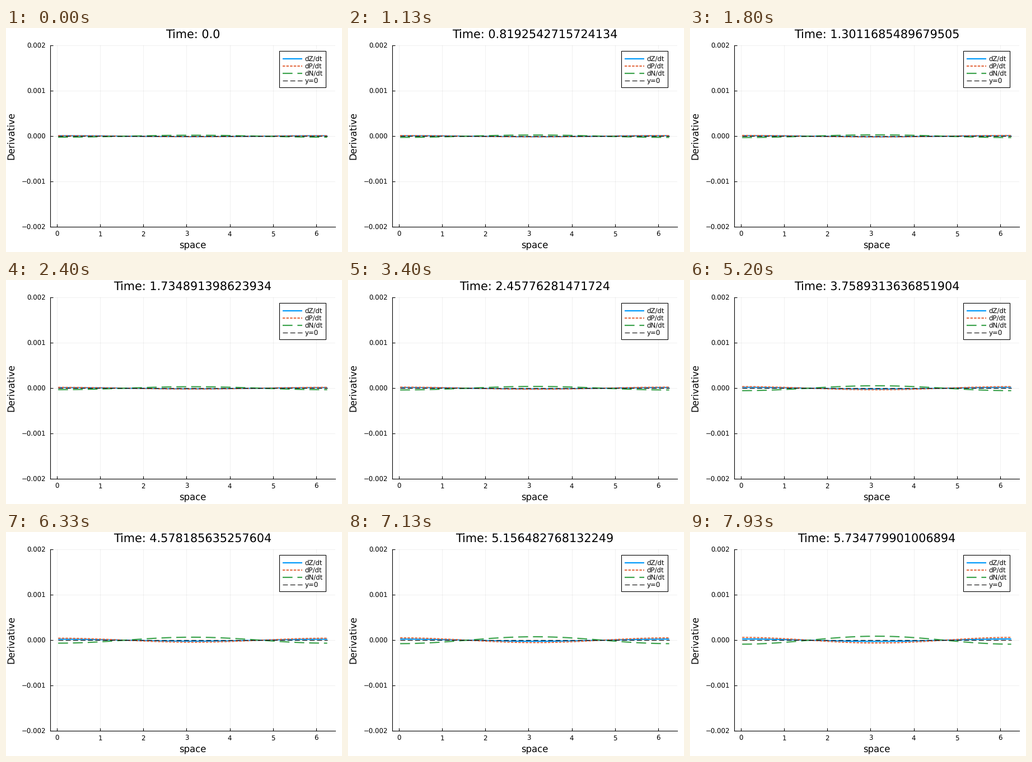
Write a matplotlib script that moves like this. It is 600 px wide and 400 px high and loops after 8 s.

```python
import numpy as np
import matplotlib.pyplot as plt
from matplotlib.animation import FuncAnimation
from matplotlib.patches import Rectangle

W, H, DPI = 600, 400, 100
TICK_MS, LOOP_MS, STEPS = 20, 8000, 120
DT, DT_SCALE = 481914277395537253, 10**19  # time per step as an exact fraction
PT = 72 / DPI                              # points per pixel
LEFT, RIGHT, TOP, BOTTOM = 78.7, 588, 31, 355.4
Y_MAX = 0.002
UNIT = 2 * Y_MAX / (BOTTOM - TOP)          # data height of one pixel
SMALL, MEDIUM, LARGE = 11.8, 16.55, 20.75

plt.rcParams["font.family"] = "DejaVu Sans"
plt.rcParams["text.hinting"] = "none"

# name, colour, width in pixels, dash pattern
SERIES = [
    ("dZ/dt", "#009AFA", 2.2, "-"),
    ("dP/dt", "#E36F47", 2.2, (0, (2, 1))),
    ("dN/dt", "#3EA44E", 2.2, (0, (8, 4))),
    ("y=0", "black", 1.1, (0, (8, 4))),
]

cells = 128
x = (np.arange(cells) + 0.5) * 2 * np.pi / cells
pad = 0.03 * (x[-1] - x[0])

fig = plt.figure(figsize=(W / DPI, H / DPI), dpi=DPI, facecolor="white")
ax = fig.add_axes([LEFT / W, 1 - BOTTOM / H, (RIGHT - LEFT) / W, (BOTTOM - TOP) / H])
ax.set_xlim(x[0] - pad, x[-1] + pad)
ax.set_ylim(-Y_MAX, Y_MAX)
ax.set_xticks(range(7))
ax.set_yticks(np.linspace(-Y_MAX, Y_MAX, 5))
ax.tick_params(direction="in", length=5 * PT, width=1.1 * PT,
               labelbottom=False, labelleft=False)
ax.grid(color="black", alpha=0.06, linewidth=PT)
ax.set_axisbelow(True)
for side, spine in ax.spines.items():
    spine.set_visible(side in ("left", "bottom"))
    spine.set_linewidth(1.1 * PT)

# Overlay measured in pixels from the top left
page = fig.add_axes([0, 0, 1, 1])
page.set_xlim(0, W)
page.set_ylim(H, 0)
page.axis("off")


def label(px, py, text, size, ha="center", **kw):
    return page.text(px, py, text, fontsize=size * PT, ha=ha, va="baseline", **kw)


def to_px(value):
    lo, hi = ax.get_xlim()
    return LEFT + (value - lo) / (hi - lo) * (RIGHT - LEFT)


for n in range(7):
    label(to_px(n), 371.8, str(n), SMALL)
for k in range(-2, 3):
    text = f"{k / 1000:.3f}".replace("-", "\u2212")
    label(71, (TOP + BOTTOM) / 2 - k * (BOTTOM - TOP) / 4 + 4.8, text, SMALL, "right")

middle = (LEFT + RIGHT) / 2
label(middle, 393, "space", MEDIUM)
label(15.3, 192.4, "Derivative", MEDIUM, rotation=90, rotation_mode="anchor")
title = label(middle, 19, "", LARGE)

page.add_patch(Rectangle((488, 41), 83, 65, facecolor="white",
                         edgecolor="black", linewidth=1.1 * PT))
curves = []
for row, (name, color, width, dash) in enumerate(SERIES):
    style = dict(color=color, linewidth=width * PT, linestyle=dash,
                 solid_capstyle="butt")
    y = 54.8 + 13 * row
    page.plot([494, 529.2], [y, y], **style)
    label(533.5, y + 4.3, name, SMALL, "left")
    curves += ax.plot(x, 0 * x, zorder=3 + row, **style)


def draw(tick):
    # Steps start on times rounded to 10 ms
    i = (tick * TICK_MS + 15) * STEPS // LOOP_MS
    t = i * DT / DT_SCALE
    title.set_text(f"Time: {t}")
    n = 1.7 * np.exp(0.25 * t)
    z = 0.85 * np.exp(0.165 * t)
    for curve, amp in zip(curves, (z, n - z, -n)):
        curve.set_ydata(amp * UNIT * np.cos(x))
    return [title, *curves]


anim = FuncAnimation(fig, draw, frames=LOOP_MS // TICK_MS, init_func=lambda: draw(0),
                     interval=TICK_MS, repeat=True, repeat_delay=0)
plt.show()
```
